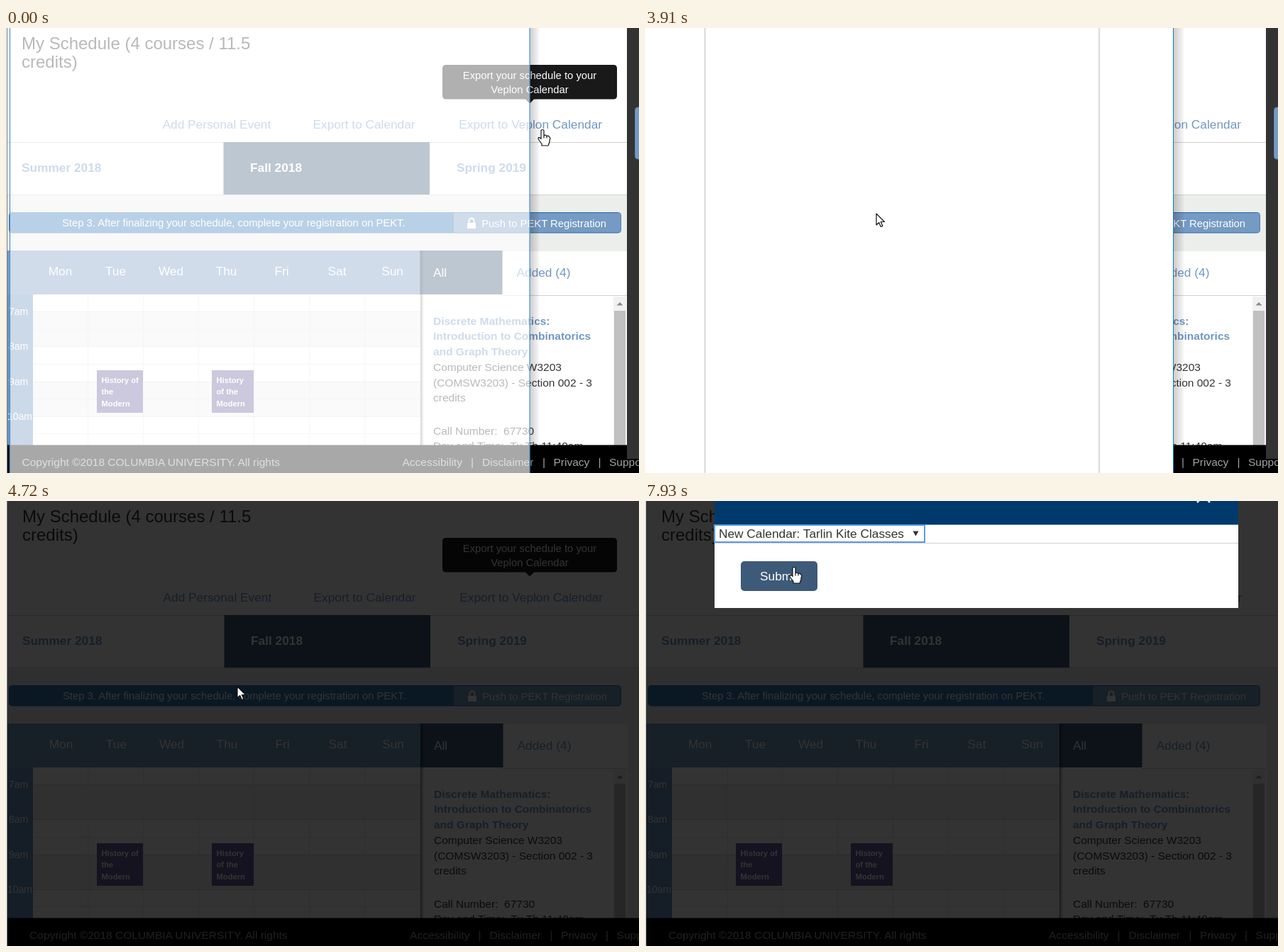
Recreate the animation shown at these times as an HTML page. Size 892 by 628 pixels, loop 8000 ms.

```html
<!DOCTYPE html>
<html lang="en">
<head>
<meta charset="utf-8">
<title>Schedule export</title>
<style>
html, body { margin: 0; width: 100%; height: 100%; overflow: hidden; background: #fff; }
svg { display: block; width: 892px; height: 628px; font: 17.3px "Liberation Sans", Arial, sans-serif; }
text { white-space: pre; }
.mid { text-anchor: middle; }
.end { text-anchor: end; }
.bold { font-weight: bold; }
.link { fill: #6f97c4; }
.white { fill: #fff; }
.dark { fill: #3e5a79; }
.blue { fill: #759ac3; }
.line { fill: #d0d0d0; }
.title { font-size: 24px; fill: #333; }
.small { font-size: 14.8px; }
.course { font-size: 15.5px; fill: #333; }
.hour { font-size: 14px; }
.event { font: bold 11.2px "Liberation Sans", Arial, sans-serif; }
.foot { font-size: 15.5px; fill: #a3a3a3; }
.chooser { font: 17.2px Roboto, sans-serif; fill: #4d5156; }
.chooser .name { font-size: 19.6px; font-weight: 500; fill: #202124; }
.chooser .large { font-size: 19.8px; fill: #3c4043; }
.chooser .head { font-size: 29.9px; fill: #202124; }
.chooser .round { font: 30px Lato, sans-serif; letter-spacing: .4px; }
.wide .shift { transform: translateX(1px); }
.wide .footshift { transform: translateX(10.6px); }
.fading .chooser { opacity: .5; }
.tiphalf .tooltip { opacity: .5; }
.rising .dialog { opacity: .75; transform: translateY(-24px); }
</style>
</head>
<body>
<svg id="stage" viewBox="0 0 892 628">
  <defs>
    <linearGradient id="fade"><stop stop-opacity=".2"/><stop offset="1" stop-opacity=".03"/></linearGradient>
    <linearGradient id="edge"><stop stop-opacity=".45"/><stop offset="1" stop-opacity="0"/></linearGradient>
    <clipPath id="ev"><rect x="128" y="483" width="222" height="60"/></clipPath>
  </defs>

  <rect class="white" width="892" height="628"/>
  <rect x="2" y="236" width="890" height="353" fill="#eceeec"/>
  <rect class="line" x="2" y="161" width="890" height="1"/>
  <rect class="line" x="2" y="235" width="890" height="1"/>

  <!-- calendar -->
  <rect class="blue" x="2" y="314" width="583" height="62"/>
  <rect class="white" x="38" y="376" width="546" height="213"/>
  <g id="grid"></g>
  <rect x="2" y="376" width="36" height="213" fill="#6b91bd"/>
  <g id="hours" class="white hour"></g>
  <rect x="128" y="483" width="65" height="60" fill="#6a619f"/>
  <rect x="290" y="483" width="59" height="60" fill="#6a619f"/>
  <g id="events" class="white event" clip-path="url(#ev)"></g>

  <!-- course list -->
  <rect class="white" x="585" y="315" width="291" height="274"/>
  <rect class="line" x="700" y="377" width="176" height="1"/>
  <rect x="856" y="379" width="18" height="210" fill="#f1f1f1"/>
  <rect x="857" y="399" width="16" height="190" fill="#c1c1c1"/>
  <path d="M860.500 391.500h9l-4.500-4.500z" fill="#888"/>

  <rect x="4.500" y="260.500" width="862" height="28.500" rx="4" fill="#337ab7" stroke="#2467a8"/>
  <path class="blue" d="M631 261h232q3.500 0 3.500 3.500v20.500q0 3.500-3.500 3.500H631z"/>

  <g class="shift">
    <text class="title" x="22" y="30">My Schedule (4 courses / 11.5</text>
    <text class="title" x="22" y="56">credits)</text>
    <g class="link">
      <text x="220.500" y="142">Add Personal Event</text>
      <text x="432.500" y="142">Export to Calendar</text>
      <text class="end" x="840" y="142">Export to Veplon Calendar</text>
      <text class="bold" x="22" y="203">Summer 2018</text>
      <text class="bold" x="635" y="203">Spring 2019</text>
      <text x="719.500" y="350.500">Added (4)</text>
    </g>
    <rect class="dark" x="306.500" y="161" width="290.500" height="74"/>
    <text class="white bold" x="344" y="203">Fall 2018</text>
    <text class="white small" x="79" y="279.500">Step 3. After finalizing your schedule, complete your registration on PEKT.</text>
    <text class="white small end" x="846" y="281">Push to PEKT Registration</text>
    <path class="white" d="M650 275h12v8h-12z"/>
    <path d="M652.500 275v-3a3.500 3.500 0 0 1 7 0v3" fill="none" stroke="#fff" stroke-width="2"/>
    <g id="days" class="white mid"></g>
    <rect class="dark" x="583" y="314" width="116.500" height="62"/>
    <text class="white" x="602" y="350.500">All</text>
    <g class="course">
      <g class="link bold">
        <text x="602" y="418.500">Discrete Mathematics:</text>
        <text x="602" y="440.300">Introduction to Combinatorics</text>
        <text x="602" y="462">and Graph Theory</text>
      </g>
      <text x="602" y="483.700">Computer Science W3203</text>
      <text x="602" y="505.500">(COMSW3203) - Section 002 - 3</text>
      <text x="602" y="527.200">credits</text>
      <text x="602" y="573.500">Call Number:  67730</text>
      <text x="602" y="595.200">Day and Time:  Tu Th 11:40am</text>
    </g>
  </g>
  <rect x="584" y="314" width="5" height="275" fill="url(#edge)"/>

  <g class="tooltip" data-on="tip tiphalf">
    <path d="M620 52h236q5 0 5 5v38.500q0 5-5 5H744l-6 6-6-6H620q-5 0-5-5V57q0-5 5-5z" fill="#191919"/>
    <g class="white small mid">
      <text x="738" y="71.500">Export your schedule to your</text>
      <text x="738" y="91.500">Veplon Calendar</text>
    </g>
  </g>

  <rect x="2" y="588.500" width="890" height="40"/>
  <g data-on="strip">
    <rect x="875" width="17" height="608" fill="#333"/>
    <rect x="886.500" y="112" width="12" height="73" rx="4" fill="#759ac3" stroke="#5a86b5"/>
  </g>
  <g class="foot footshift">
    <text x="22.500" y="618">Copyright ©2018 COLUMBIA UNIVERSITY. All rights</text>
    <text x="558.500" y="618">Accessibility</text><text x="655" y="618">|</text>
    <text x="671" y="618">Disclaimer</text><text x="756" y="618">|</text>
    <text x="771.500" y="618">Privacy</text><text x="834.500" y="618">|</text>
    <text x="850" y="618">Support</text>
  </g>
  <rect x="1" width="1" height="628" fill="#777"/>

  <!-- popup window opening and closing -->
  <g data-on="ghost">
    <rect x="738" width="13" height="628" fill="url(#fade)"/>
    <rect class="white" x="5" width="733" height="628" opacity=".66"/>
    <path d="M5.500 0v628M738 0v628" stroke="#4d94cf" stroke-width="1.200"/>
  </g>
  <g data-on="veil">
    <rect x="743" width="15" height="628" fill="url(#fade)"/>
    <rect class="white" x="2" width="741" height="628" opacity=".92"/>
    <path d="M743 0v628" stroke="#2a87d4"/>
  </g>
  <g data-on="shade">
    <rect x="9" width="724" height="628" opacity=".4"/>
    <path d="M9.500 0v628M733.500 0v628" stroke="#3a5a7a" opacity=".6"/>
  </g>

  <g data-on="popup">
    <rect x="745" width="14" height="628" fill="url(#fade)"/>
    <rect class="white" width="745" height="628"/>
    <g data-on="card" fill="none">
      <rect x="94.500" y="-20" width="556" height="580" rx="9" stroke="#aaa" stroke-width="1.500" opacity=".5"/>
      <rect class="white" x="94.500" y="-20" width="556" height="578.500" rx="9" stroke="#c4c4c4"/>
    </g>
    <path data-on="sides" d="M84.500 0v628M640 0v628" stroke="#cfcfcf" stroke-width="1.500"/>
    <g data-on="list">
      <rect x="725" width="19" height="628" fill="#f1f1f1"/>
      <rect x="726" width="17" height="497" fill="#c1c1c1"/>
      <path d="M730 624h9l-4.500 4.500z" fill="#505050"/>
      <g class="chooser">
        <rect data-on="hover1" x="85" y="136" width="554.500" height="104" fill="#eee"/>
        <rect data-on="hover2" x="85" y="241" width="554.500" height="79" fill="#eee"/>
        <path d="M134 240.500h456m-456 80h456m-456 80h456m-456 81h456m-456 58h456" stroke="#d3d3d3"/>
        <g id="accounts"></g>
        <g data-on="names">
          <text data-on="plain" class="head mid" x="361" y="57">Choose an account</text>
          <text data-on="webfont" class="head round mid" x="361.500" y="57">Choose an account</text>
          <text class="large" x="238" y="98.500">to continue to <tspan font-weight="500" fill="#3b78e7">columbia.edu</tspan></text>
        </g>
        <text x="184" y="219" font-style="italic">Signed out</text>
        <circle cx="151.500" cy="509" r="12.300" fill="#666a6e"/>
        <circle class="white" cx="151.500" cy="505" r="3.900"/>
        <path class="white" d="M144 515.500c1-5 14-5 15 0a9.500 9.500 0 0 1-15 0z"/>
        <text class="large" x="188.500" y="517">Use another account</text>
        <text x="134" y="631">To continue, Veplon will share your name, email address</text>
      </g>
    </g>
    <rect x="744" width="1" height="628" fill="#1079d0"/>
  </g>

  <rect data-on="dim" x="2" width="890" height="628" opacity=".8"/>
  <g class="dialog" data-on="modal">
    <rect class="white" x="98" y="-30" width="738" height="181"/>
    <rect x="98" y="-30" width="738" height="63.500" fill="#003a6c"/>
    <path d="M778 2l18-18m0 18l-18-18" stroke="#dfe6ee" stroke-width="2.500"/>
    <rect class="line" x="98" y="59" width="738" height="1"/>
    <rect x="98.500" y="34.500" width="295.500" height="23" fill="#fff" stroke="#a9a9a9"/>
    <rect data-on="picked" x="98.500" y="34.500" width="295.500" height="23" fill="none" stroke="#6b6b6b"/>
    <rect data-on="focus" x="98" y="34" width="296" height="24" fill="none" stroke="#5b9bea" stroke-width="2"/>
    <g fill="#333">
      <text data-on="mail" x="104" y="52">cbe3154@norvelia.edu</text>
      <text data-on="chosen" x="104" y="52">New Calendar: Tarlin Kite Classes</text>
      <path d="M377.500 42.500h8l-4 7z"/>
    </g>
    <rect class="dark" x="135" y="85" width="108" height="42" rx="5"/>
    <text class="white mid" x="189" y="111.500">Submit</text>
    <g data-on="menu" fill="#333">
      <rect x="98.500" y="58.500" width="295.500" height="44" fill="#fff" stroke="#7f9db9"/>
      <rect data-on="opt1" x="99" y="59" width="294.500" height="21.500" fill="#1e90ff"/>
      <rect data-on="opt2" x="99" y="80.500" width="294.500" height="21.500" fill="#1e90ff"/>
      <text x="104" y="75.500">cbe3154@norvelia.edu</text>
      <text x="104" y="97">New Calendar: Tarlin Kite Classes</text>
      <text data-on="opt1" class="white" x="104" y="75.500">cbe3154@norvelia.edu</text>
      <text data-on="opt2" class="white" x="104" y="97">New Calendar: Tarlin Kite Classes</text>
    </g>
  </g>

  <g id="cursor" fill="#fff" stroke="#111" stroke-width="1.200" stroke-linejoin="round">
    <path id="hand" d="M-2 13V2q0-2 2-2t2 2v6q3-1 4 1 3-1 3.500 1.500Q12 11 10 14.500V17L8 22.500H-1V20L-5.500 14q-1-2 0-3 1.500-.500 3.500 2zM2 8v4m4-3v3"/>
    <path id="arrow" d="M0 0v16l3.700-3.500 2.600 6 2.600-1.100-2.600-5.900h5.200z"/>
  </g>
</svg>

<script>
const $ = id => document.getElementById(id);
const stage = $('stage');
const text = (x, y, s, cls = '') => `<text x="${x}" y="${y}" class="${cls}">${s}</text>`;
const rect = (x, y, w, h, fill) => `<rect x="${x}" y="${y}" width="${w}" height="${h}" fill="${fill}"/>`;

let grid = rect(38, 401, 546, 49, '#f0f0f0') + rect(38, 499, 546, 49, '#f0f0f0');
for (let i = 1; i < 9; i++) grid += rect(38, Math.round(375.5 + i * 24.6), 546, 1, i % 2 ? '#d9d9d9' : '#e6e6e6');
for (let i = 1; i < 7; i++) grid += rect(37 + i * 78, 376, 1, 213, '#e6e6e6');
$('grid').innerHTML = grid;

$('days').innerHTML = ['Mon', 'Tue', 'Wed', 'Thu', 'Fri', 'Sat', 'Sun']
  .map((d, i) => text(76.5 + i * 78, 348.5, d)).join('');
$('hours').innerHTML = ['7am', '8am', '9am', '10am']
  .map((h, i) => text(i < 3 ? 4 : 2, 405 + i * 49.4, h)).join('');

const event = (x, lines) => lines.map((s, i) => text(x, 500.5 + i * 16.7, s)).join('');
$('events').innerHTML = event(134.5, ['History of', 'the', 'Modern', 'Middle']) +
  event(296.5, ['History', 'of the', 'Modern', 'Middle']);

$('accounts').innerHTML = [
  [168.5, '#33691e', 'Cheta Ezolambe', 'cezolambe12@qumil.com'],
  [273, '#8d6e63', 'Cyrus Bartley Ezolambe Jr.', 'cbe3154@norvelia.edu'],
  [353, '#0288d1', 'Cyrus Ezolambe', 'cbezolambe@qumil.com'],
  [433, '#ef6c00', 'Cyrus Ezolambe', 'cyrus.ezolambe@norveliachronicle.com']
].map(([y, color, name, mail]) =>
  `<circle cx="151.5" cy="${y}" r="17.5" fill="${color}"/>` +
  text(151.5, y + 6.5, 'C', 'white mid') +
  `<g data-on="names">${text(184, y + 1.3, name, 'name')}</g>` +
  text(184, y + 26, mail)).join('');

// Each cue holds until the next one.
const list = 'strip popup sides list ', box = 'wide dim modal ';
const cues = [
  [0, 'strip tip ghost'], [120, 'strip veil'], [250, 'strip popup'], [1680, 'strip popup card'],
  [1830, list], [1980, list + 'names plain'], [2420, list + 'names webfont'],
  [2580, list + 'names webfont hover1'], [2720, list + 'names webfont hover2'],
  [3780, list + 'names webfont hover2 fading'], [3910, 'strip popup sides'],
  [4300, 'strip shade'], [4450, 'strip tip'], [4590, 'wide tip'], [4720, 'wide tip dim'],
  [4860, box + 'tip mail rising'], [4990, box + 'tip mail'], [5570, box + 'tip mail picked'],
  [6030, box + 'tip mail focus'], [6160, box + 'tiphalf mail focus menu opt1'],
  [6300, box + 'mail focus menu opt1'], [6700, box + 'mail focus menu opt2'],
  [7250, box + 'chosen focus']
];

// time, x, y of the pointer tip
const track = [
  [0, 756, 143.5], [1830, 648, 172], [1980, 563, 181], [2420, 494, 180], [2580, 460, 205],
  [2720, 412, 244], [2840, 367, 278.5], [2960, 358, 285], [3080, 353, 287], [3240, 334, 270],
  [3360, 326, 262], [4860, 325, 254], [4990, 320, 236], [5140, 299, 160], [5290, 299, 100],
  [5420, 299, 63], [5570, 299, 36], [5730, 298.5, 34.5], [5880, 297.5, 43], [6300, 298, 49],
  [6580, 295, 62], [6700, 291, 82], [6820, 286, 98], [7380, 270, 94], [7530, 238, 86],
  [7650, 227, 88], [7800, 216, 91], [7930, 210, 93.5]
];

const parts = [...document.querySelectorAll('[data-on]')];
const at = (rows, t) => rows.findLast(r => r[0] <= t);
let shown;

function draw(now) {
  const t = now % 8000;
  const cue = at(cues, t), [, x, y] = at(track, t);
  if (cue !== shown) {
    const on = cue[1].split(' ');
    stage.setAttribute('class', cue[1]);
    for (const p of parts)
      p.style.display = p.dataset.on.split(' ').some(k => on.includes(k)) ? '' : 'none';
    shown = cue;
  }
  const arrow = t >= 1830 && t < 1980 || t >= 3910 && t < 7530;
  $('arrow').style.display = arrow ? '' : 'none';
  $('hand').style.display = arrow ? 'none' : '';
  $('cursor').setAttribute('transform', `translate(${x} ${y})`);
  requestAnimationFrame(() => draw(performance.now()));
}
draw(performance.now());
</script>
</body>
</html>
```
